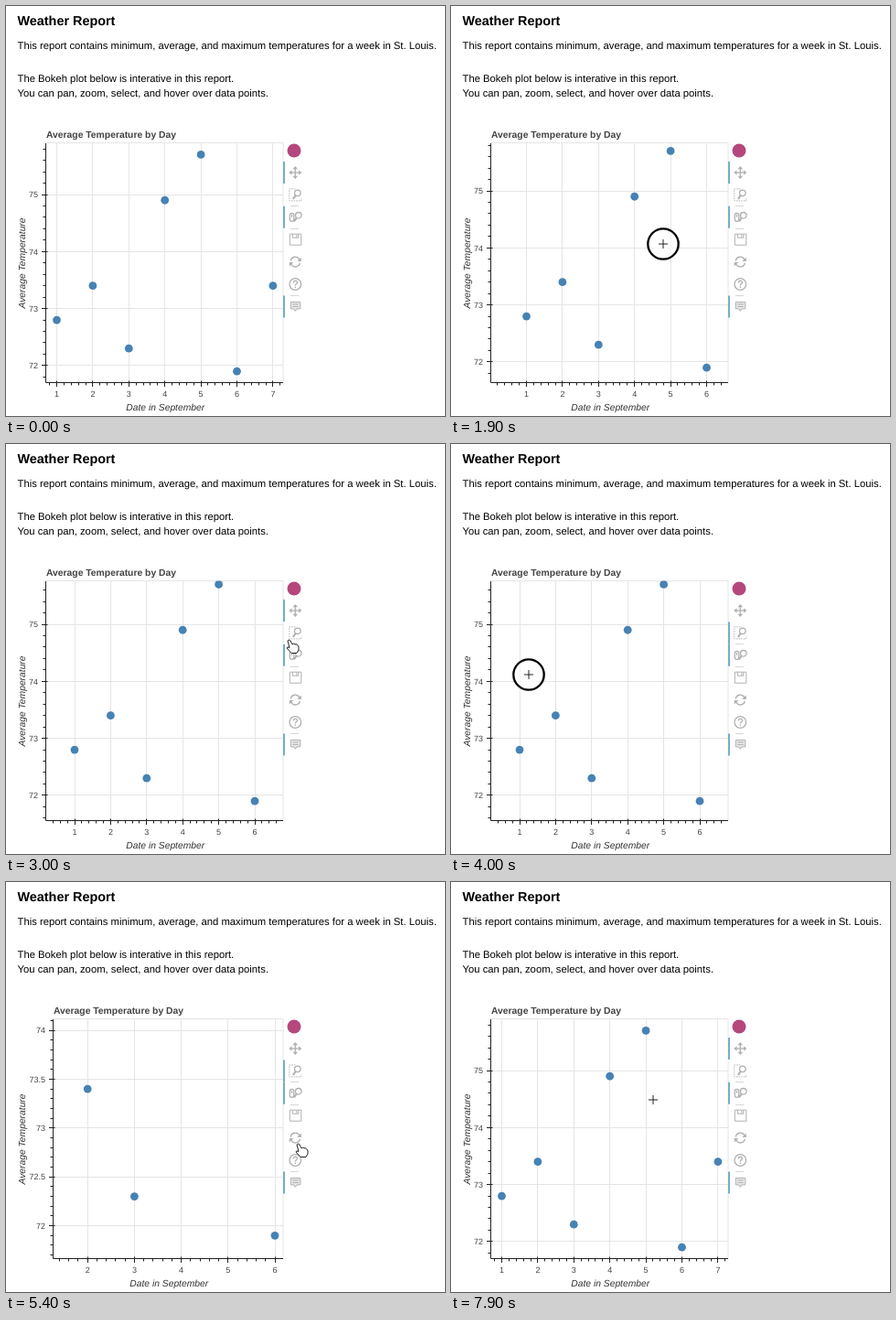
Write an HTML page that moves like this. It is 480 px wide and 448 px high and loops after 8000 ms.

```html
<!DOCTYPE html>
<html lang="en">
<head>
<meta charset="utf-8">
<title>Weather Report</title>
<style>
html, body { margin: 0; width: 100%; height: 100%; overflow: hidden; background: #fff; }
svg { display: block; font: 11.28px "Liberation Sans", Arial, sans-serif; text-rendering: geometricPrecision; }
.heading { font-weight: bold; font-size: 14.4px; }
.title { font-weight: bold; font-size: 10.35px; fill: #444; }
.axis { font-style: italic; font-size: 10.3px; fill: #333; }
.tick { font-size: 9px; fill: #444; }
.icons { fill: none; stroke: #b0b0b0; stroke-width: 1.3; }
.icons .solid { fill: #b0b0b0; stroke: none; }
.icons .thin { stroke-width: 1; }
</style>
</head>
<body>
<svg width="480" height="448" viewBox="0 0 480 448">
  <clipPath id="frame"><rect id="clip" y="149.5" height="262"/></clipPath>
  <text x="12.5" y="21" class="heading">Weather Report</text>
  <text x="12.5" y="46.5">This report contains minimum, average, and maximum temperatures for a week in St. Louis.</text>
  <text x="12.5" y="83">The Bokeh plot below is interative in this report.</text>
  <text x="12.5" y="99">You can pan, zoom, select, and hover over data points.</text>
  <text class="axis" text-anchor="middle" transform="translate(21 281) rotate(-90)">Average Temperature</text>
  <g id="plot"></g>
  <circle cx="315" cy="158" r="7.5" fill="#b5477d"/>
  <g id="icons" class="icons"></g>
  <path id="bars" stroke="#4a98b4" stroke-width="1.5"/>
  <g id="pointer"></g>
</svg>
<script>
const LOOP = 8000, STEP = 100, MOVE = 400;
const RIGHT = 303, TOP = 150, BOTTOM = 411.5;
const PAN_START = 600, PAN_END = 2200, PICK_ZOOM = 3300, BOX_START = 3600, ZOOM = 4600, RESET = 5700;
const temps = [72.8, 73.4, 72.3, 74.9, 75.7, 71.9, 73.4];

// Where the cursor comes to rest: [arrival time, x, y]
const stops = [
  [100, 394, 20], [PAN_START, 205, 268], [1000, 177, 262], [1800, 232, 264], [1900, 232, 260],
  [PAN_END, 224.5, 259], [2600, 346, 225], [3000, 310, 214], [PICK_ZOOM, 313, 206],
  [BOX_START, 85, 252], [4400, 275, 405], [5400, 320, 286], [6400, 134, 379],
  [6800, 65, 343], [7400, 218, 166], [7900, 221, 238]
];
const presses = [[PAN_START, PAN_END], [3200, PICK_ZOOM], [BOX_START, ZOOM], [RESET - 100, RESET + 200]];

const $ = id => document.getElementById(id);
const within = (v, lo, hi) => v >= lo && v < hi;
const crisp = v => Math.floor(v) + 0.5;
const toolY = i => 182 + 24.4 * i;
const path = (d, attrs = "") => `<path d="${d}" ${attrs}/>`;
const text = (x, y, str, cls, anchor = "start") =>
  `<text class="${cls}" x="${x}" y="${y}" text-anchor="${anchor}">${str}</text>`;

function drawIcons() {
  const turned = (shape, angles) => angles.map(a => `<g transform="rotate(${a})">${shape}</g>`).join("");
  const lens = x => `<circle cx="${x}" cy="-2" r="3.3"/>` + path(`M${x - 2} .5l-3 4`, 'stroke-width="2"');
  const arrow = path("M0 0V-5") + path("M0-7l2.8 3.2h-5.6z", 'class="solid"');
  const refresh = path("M-5-1A5 5 0 0 1 4.500-2.500") + path("M6.500-5v4.500h-4.500z", 'class="solid"');
  const icons = [
    turned(arrow, [0, 90, 180, 270]),
    path("M0-6.500h-6.500v13h13v-3", 'class="thin" stroke-dasharray="1.5 1.2"') + lens(2.5),
    '<rect x="-6" y="-4.5" width="4.500" height="9" rx="2.2"/>' + path("M-3.800-3v3") + lens(3.5),
    path("M-6-6h12.500v12h-12.500zM-3-6v4h6.500v-4M1.500-5.500v3", 'class="thin"'),
    turned(refresh, [0, 180]),
    '<circle r="6.3"/>' + path("M-2-1.500c0-3 4.200-3 4.200-.3c0 1.700-2.200 1.500-2.200 3.300M0 2.600v1.400"),
    path("M-5-5h10.500v7.500h-4l-1.500 2.500l-1.500-2.500h-3.500zM-3-2.500h6.500M-3 0h6.500", 'class="thin" fill="#e8e8e8"')
  ];
  const dividers = [1, 2, 5].map(i => `M311 ${crisp(toolY(i + 0.5))}h9`).join("");
  $("icons").innerHTML = path(dividers, 'class="thin" opacity=".5"') +
    icons.map((icon, i) => `<g transform="translate(316.3 ${toolY(i)})">${icon}</g>`).join("");
}

function cursorAt(t) {
  const i = stops.findIndex(stop => stop[0] > t);
  if (i < 1) return stops.at(i).slice(1);
  const [from, x0, y0] = stops[i - 1], [to, x1, y1] = stops[i];
  const start = Math.max(from, to - MOVE);
  const u = Math.max(0, (t - start) / (to - start)), e = u * u * (3 - 2 * u);
  return [x0 + (x1 - x0) * e, y0 + (y1 - y0) * e];
}

function viewAt(t) {
  if (within(t, ZOOM, RESET))
    return { left: 51.5, day1: 38, dayPx: 51.2, y75: 55.2, degPx: 106.8, minor: 0.1 };
  const view = { left: 43.5, day1: 55.5, dayPx: 39.4, y75: 206, degPx: 62.3, minor: 0.2 };
  if (within(t, PAN_START, ZOOM)) {
    // The plot trails the dragging cursor by one step.
    const [x, y] = cursorAt(Math.min(t - STEP, PAN_END)), [gx, gy] = cursorAt(PAN_START);
    if (t > PAN_START + STEP) { view.day1 += x - gx; view.y75 += y - gy; }
  }
  return view;
}

function drawPlot(t) {
  const { left, day1, dayPx, y75, degPx, minor } = viewAt(t);
  const px = day => day1 + (day - 1) * dayPx;
  const py = temp => y75 + (75 - temp) * degPx;
  let grid = `M${left} ${TOP - 0.5}H${RIGHT}V${BOTTOM}`, labels = "";
  let axes = `M${left} ${TOP}V${BOTTOM}H${RIGHT}`;

  for (let k = 0; k < 50; k++) {
    const x = px(k / 5), cx = crisp(x), major = k % 5 === 0;
    if (!within(x, left, RIGHT)) continue;
    axes += `M${cx} ${BOTTOM - (major ? 2 : 0)}V${BOTTOM + (major ? 4.5 : 3)}`;
    if (!major) continue;
    grid += `M${cx} ${TOP}V${BOTTOM}`;
    labels += text(x, 427, k / 5, "tick", "middle");
  }
  for (let k = 0; k < 70; k++) {
    const temp = 70 + k * minor, y = py(temp), cy = crisp(y), major = k % 5 === 0;
    if (!within(y, TOP, BOTTOM)) continue;
    axes += `M${left - (major ? 4.5 : 3)} ${cy}H${left + (major ? 2 : 0)}`;
    if (!major) continue;
    grid += `M${left} ${cy}H${RIGHT}`;
    labels += text(left - 8.5, y + 3.2, +temp.toFixed(1), "tick", "end");
  }
  const dots = temps.map((temp, i) =>
    `<circle cx="${px(i + 1)}" cy="${py(temp)}" r="4.4" fill="#4682b4"/>`).join("");

  $("clip").setAttribute("x", left);
  $("clip").setAttribute("width", RIGHT - left);
  $("plot").innerHTML = path(grid, 'stroke="#e5e5e5" fill="none"') +
    `<g clip-path="url(#frame)">${dots}</g>` + path(axes, 'stroke="#222" fill="none"') + labels +
    text(left + 0.5, 144, "Average Temperature by Day", "title") +
    text((left + RIGHT) / 2 + 1, 442, "Date in September", "axis", "middle") + selection(t);
}

function selection(t) {
  if (!within(t, BOX_START, ZOOM)) return "";
  const [x0, y0] = cursorAt(BOX_START), [x, y] = cursorAt(t);
  return `<rect x="${x0}" y="${y0}" width="${x - x0}" height="${y - y0}" fill="#d3d3d3"
    fill-opacity=".5" stroke="#000" stroke-width="1.5" stroke-dasharray="3"/>`;
}

function drawPointer(t) {
  if (t < stops[0][0]) return $("pointer").innerHTML = "";
  const [x, y] = cursorAt(t);
  const inPlot = within(x, 43, RIGHT) && within(y, TOP, BOTTOM);
  const onTool = within(x, 307, 326) && within(y, TOP, 340);
  const pressed = presses.some(([from, to]) => within(t, from, to));
  const ring = pressed
    ? '<circle r="16.700" fill="#fff" fill-opacity=".6" stroke="#000" stroke-width="2.3"/>' : "";
  const cross = path("M-5 0H5M0-5V5", 'stroke="#222"');
  const hand = path("M-2 1Q-1-1 1 1L3 5Q5 3 6 5Q8 4 8.500 6Q10 6 10 8V11L8 14.500H2L-3 9Q-3 7 0 8.500Z",
    'fill="#fff" stroke="#222"');
  const arrow = path("M0 0V12L3 9.500L5 14L7 13L5 8.700H9Z", 'stroke="#fff"');
  $("pointer").innerHTML =
    `<g transform="translate(${x} ${y})">${ring}${inPlot ? cross : onTool ? hand : arrow}</g>`;
}

function draw(t) {
  const dragTool = within(t, PICK_ZOOM, RESET) ? 1 : 0;
  $("bars").setAttribute("d", [dragTool, 2, 6].map(i => `M304 ${toolY(i) - 12}v24`).join(""));
  drawPlot(t);
  drawPointer(t);
}

let shown = -1;
function tick() {
  const t = Math.floor(performance.now() % LOOP / STEP) * STEP;
  if (t !== shown) draw(shown = t);
  requestAnimationFrame(tick);
}
drawIcons();
tick();
</script>
</body>
</html>
```
